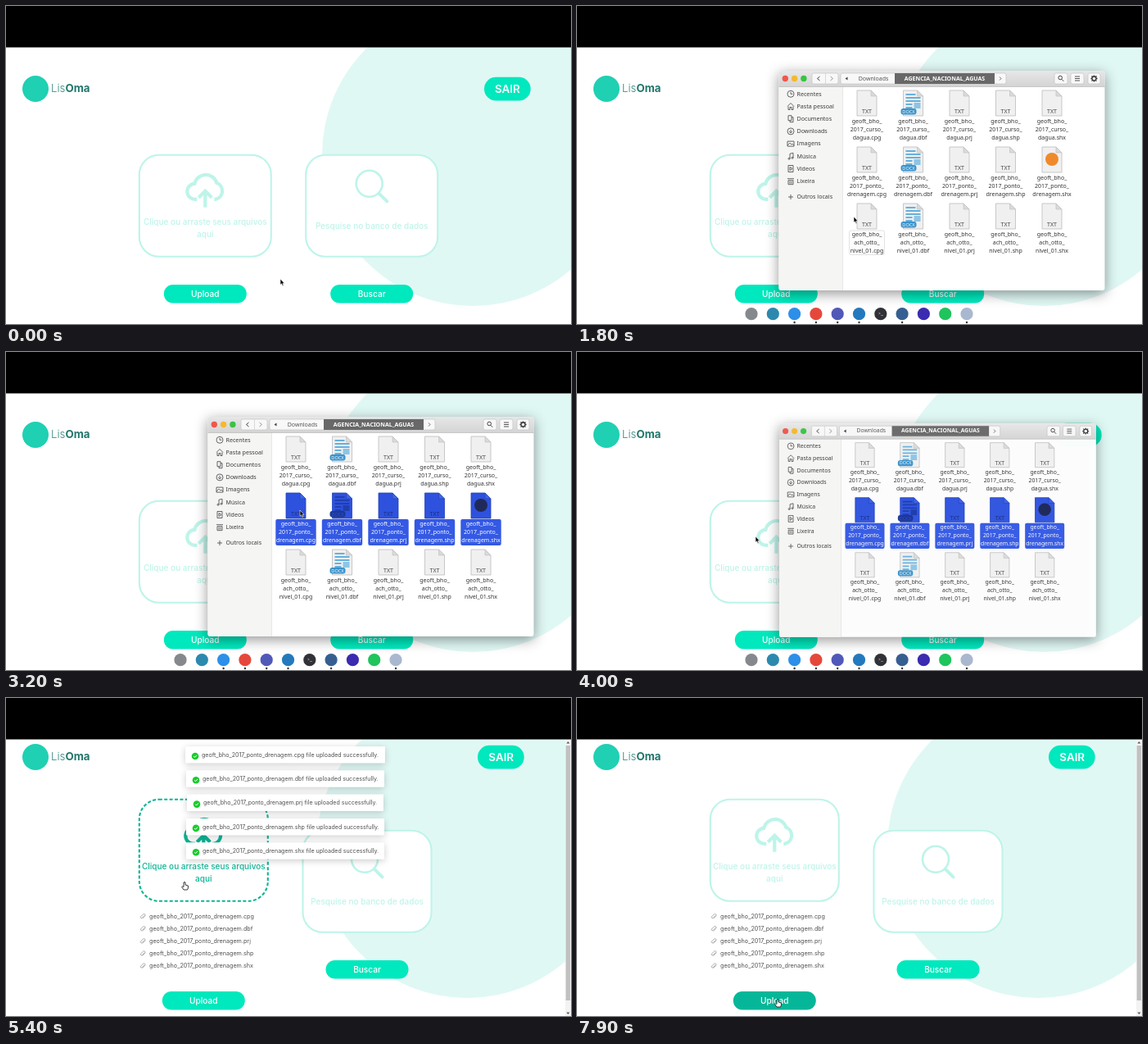
These frames come from a looping animation (690 px wide and 388 px high, 8 s). An HTML page with a canvas:

```html
<!DOCTYPE html>
<html lang="pt">
<head>
<meta charset="utf-8">
<style>
html, body { margin: 0; width: 690px; height: 388px; overflow: hidden; background: #fff; }
canvas { display: block; }
</style>
</head>
<body>
<canvas id="stage" width="690" height="388"></canvas>
<script>
const c = document.getElementById('stage').getContext('2d');
const LOOP = 8000, STEP = 100, TAU = Math.PI * 2;
const UI = 'Inter, sans-serif', DESK = '"Noto Sans", sans-serif';
const MINT = '#00e8bd', PALE = [190, 244, 233], TEAL = [12, 181, 150];
const EXTS = ['cpg', 'dbf', 'prj', 'shp', 'shx'];
const ROWS = [['2017_curso_', 'dagua'], ['2017_ponto_', 'drenagem'], ['ach_otto_', 'nivel_01']];

const ramp = (t, a, b) => Math.min(1, Math.max(0, (t - a) / (b - a)));
const ease = p => p * p * (3 - 2 * p);
const mix = (a, b, p) => a + (b - a) * p;
const blend = p => `rgb(${PALE.map((v, i) => Math.round(mix(v, TEAL[i], p)))})`;

// Pointer tip: time, x, y
const ROUTE = [[0, 335, 333], [100, 335, 333], [500, 265, 375], [850, 265, 375], [1700, 338, 257],
  [1850, 338, 257], [2000, 328, 239], [2600, 606, 186], [2700, 606, 186], [3100, 359, 193],
  [3300, 359, 193], [3900, 218, 225], [6450, 218, 225], [6800, 244, 356], [7100, 244, 356],
  [7400, 245, 368], [8000, 245, 368]];

function pointerAt(t) {
  const i = Math.max(1, ROUTE.findIndex(k => k[0] > t));
  const [a, b] = [ROUTE[i - 1], ROUTE[i]];
  const p = ease(ramp(t, a[0], b[0]));
  return [mix(a[1], b[1], p), mix(a[2], b[2], p)];
}

function rect(x, y, w, h, r, fill, stroke, line = 1) {
  c.beginPath();
  c.roundRect(x, y, w, h, r);
  if (fill) { c.fillStyle = fill; c.fill(); }
  if (stroke) { c.strokeStyle = stroke; c.lineWidth = line; c.stroke(); }
}
function disc(x, y, r, fill) {
  c.beginPath();
  c.arc(x, y, r, 0, TAU);
  c.fillStyle = fill;
  c.fill();
}
function text(s, x, y, size, fill, { align = 'center', weight = 400, font = UI } = {}) {
  c.font = `${weight} ${size}px ${font}`;
  c.textAlign = align;
  c.textBaseline = 'middle';
  c.fillStyle = fill;
  c.fillText(s, x, y);
}
function path(d, x, y, stroke, line, fill) {
  const shape = new Path2D(d);
  c.save();
  c.translate(x, y);
  if (fill) { c.fillStyle = fill; c.fill(shape); }
  if (stroke) { c.strokeStyle = stroke; c.lineWidth = line; c.stroke(shape); }
  c.restore();
}
function shadow(blur, alpha, y = 2) {
  c.shadowColor = `rgba(0,0,0,${alpha})`;
  c.shadowBlur = blur;
  c.shadowOffsetY = y;
}
function noShadow() { c.shadowColor = 'transparent'; }

function button(label, cx, top, fill = MINT) {
  rect(cx - 50.5, top, 101, 22.5, 11.2, fill);
  text(label, cx, top + 11.8, 10.1, '#fff', { weight: 500 });
}

function card(cx, top, width, color, dashed) {
  c.setLineDash(dashed ? [4, 2.4] : []);
  rect(cx - width / 2 + 1, top + 1, width - 2, 124, 24, '#fff', color, 2.1);
  c.setLineDash([]);
}

function page(t) {
  // The whole page lifts while the growing list pushes the left column apart.
  const lift = ramp(t, 4150, 4600), grow = ramp(t, 4210, 4660);
  const bar = t >= 4600 ? 1 : 0;
  const hover = ramp(t, 4150, 4650) * (1 - ramp(t, 6500, 6800));
  const leftTop = 180.8 - 20 * lift - 38 * grow, rightTop = 180.8 - 20 * lift;
  const leftX = 243.3 - 2 * bar, rightX = 446.7 - 5.7 * bar;
  const width = 163 - 4 * bar, headY = 101 - 29 * grow;
  const tint = blend(hover), pale = blend(0);

  disc(570 - 7 * bar, 182, 184, '#e0f8f4');

  disc(36, headY, 16, '#1fd0b3');
  text('Lis', 55, headY, 13.3, '#35877c', { align: 'left', weight: 300 });
  const half = c.measureText('Lis').width;
  text('Oma', 55 + half, headY, 13.3, '#22776c', { align: 'left', weight: 700 });
  rect(584 - 8 * bar, headY - 14.2, 56.7, 28.7, 14.3, MINT);
  text('SAIR', 612.3 - 7.6 * bar, headY + .7, 13.4, '#fff', { weight: 600 });

  card(leftX, leftTop, width, tint, t >= 4150 && t < 6650);
  path('M-10 55h-2a9.5 9.5 0 0 1-1-19a14 14 0 0 1 27-1a10.5 10.5 0 0 1-1 20h-2M0 65V45M-8 53L0 45L8 53',
    leftX, leftTop, tint, 4.2);
  text('Clique ou arraste seus arquivos', leftX, leftTop + 83, 10, tint, { weight: 500 });
  text('aqui', leftX, leftTop + 98.5, 10, tint, { weight: 500 });

  card(rightX, rightTop, width, pale);
  path('M13 36a16 16 0 1 1-32 0a16 16 0 1 1 32 0', rightX, rightTop, pale, 2.6);
  c.lineCap = 'round';
  path('M9 48L18.5 57.5', rightX, rightTop, pale, 4);
  c.lineCap = 'butt';
  text('Pesquise no banco de dados', rightX, rightTop + 88, 10, pale, { weight: 500 });

  const spread = 15.1 * grow ** 1.5;
  EXTS.forEach((ext, i) => {
    c.globalAlpha = i === 4 ? ramp(grow, 0, .7) : ramp(grow, .5, 1);
    const y = leftTop + 143.7 + i * spread;
    path('M2 -1L-1 2A1.2 1.2 0 0 1-2.6 .4L.6 -2.8A1.6 1.6 0 0 1 2.8 -.6L-.6 2.8', 167, y, '#888', .7);
    text(`geoft_bho_2017_ponto_drenagem.${ext}`, 175, y, 7.2, '#505050', { align: 'left' });
  });
  c.globalAlpha = 1;

  button('Upload', leftX, 340 - 20 * lift + 38 * grow, t >= 7300 ? '#05b798' : MINT);
  button('Buscar', rightX, rightTop + 159.2);

  if (bar) {
    rect(683, 50, 7, 338, 0, '#f3f3f3');
    rect(683.7, 58, 5.3, 311, 0, '#c1c1c1');
    path('M-2 1.5L0 -1L2 1.5ZM-2 329.5L0 332L2 329.5Z', 686.4, 54, null, 0, '#555');
  }
}

function toasts(t) {
  EXTS.forEach((ext, i) => {
    const show = ease(ramp(t, 4700 + 90 * i, 4900 + 90 * i));
    const hide = ramp(t, 7450 + 50 * i, 7650 + 50 * i);
    const alpha = show * (1 - hide);
    if (!alpha) return;
    const w = [244, 242, 240, 242, 242][i], x = 341 - w / 2;
    const y = 59 + 29.3 * i - 20 * (1 - alpha);
    c.globalAlpha = alpha;
    shadow(9, .2);
    rect(x, y, w, 20.5, 1, '#fff');
    noShadow();
    disc(x + 12, y + 12, 4.3, '#18cc2c');
    path('M-1.9 0L-.5 1.4L2 -1.3', x + 12, y + 12, '#fff', 1);
    text(`geoft_bho_2017_ponto_drenagem.${ext} file uploaded successfully.`, x + 20, y + 10.7, 7.05,
      '#505050', { align: 'left' });
    c.globalAlpha = 1;
  });
}

function fileIcon(cx, top, kind, selected) {
  const x = cx - 12;
  const edge = selected ? '#2142b8' : '#bcbcbc';
  path('M0 0H17L24 7V31H0Z', x, top, edge, .8, selected ? '#2e52de' : '#f0f0f0');
  path('M17 0V7H24Z', x, top, edge, .6, selected ? '#4264e6' : '#dadada');
  if (kind === 'docx') {
    path('M3 5H15M3 9H21M3 13H21M3 17H11M3 21H11', x, top, selected ? '#203fae' : '#68b0dd', 1.8);
    rect(x + 13, top + 15, 8, 7, 0, selected ? '#203fae' : '#8cc5e6');
    rect(x - 3, top + 22, 19, 7.5, 3, selected ? '#1c3796' : '#3b93cb');
    text('DOCX', x + 6.5, top + 26, 5.6, selected ? '#2e52de' : '#fff', { font: DESK });
  } else if (kind === 'disc') {
    disc(cx, top + 15, 8, selected ? '#202a58' : '#ef8a2c');
  } else {
    text('TXT', cx, top + 26, 7, selected ? '#1a2f80' : '#4c4c4c', { font: DESK });
  }
}

const kindOf = (row, col) => col === 1 ? 'docx' : row === 1 && col === 4 ? 'disc' : 'txt';

const PLACES = [
  ['Recentes', 'M4 0A4 4 0 1 1-4 0A4 4 0 1 1 4 0M0 -2.4V0H2.4'],
  ['Pasta pessoal', 'M-4 0L0 -4L4 0M-3 0V4H-1V1H1V4H3V0'],
  ['Documentos', 'M-3 -4H1V2H-3ZM-1 2V4H3V-2H1'],
  ['Downloads', 'M4 0A4 4 0 1 1-4 0A4 4 0 1 1 4 0M0 -2V2M-2 0L0 2L2 0'],
  ['Imagens', 'M-4 -3H4V3H-4ZM-4 2L-1 -1L1 1L2 0L4 2'],
  ['Música', 'M-1 3V-3L3 -4V2M-1 3A1 1 0 1 1-3 3A1 1 0 1 1-1 3M3 2A1 1 0 1 1 1 2A1 1 0 1 1 3 2'],
  ['Vídeos', 'M-3 -4H3V4H-3ZM-1 -2V2L2 0Z'],
  ['Lixeira', 'M-4 -3H4M-3 -1H3V4H-3ZM-1 0V3M1 0V3'],
  ['Outros locais', 'M-3 0H3M0 -3V3']
];

function fileWindow(t, pointer) {
  const open = ease(ramp(t, 650, 880)) * (1 - ease(ramp(t, 3980, 4180)));
  if (!open) return;
  c.save();
  c.globalAlpha = open;
  c.translate(265 * (1 - open), 376 * (1 - open));
  c.scale(open, open);

  shadow(16, .42, 4);
  rect(246.5, 79, 398, 268, 3, '#fff');
  noShadow();
  rect(246.5, 98, 78, 249, [0, 0, 0, 3], '#f5f5f4');
  rect(324, 98, .7, 249, 0, '#dedede');
  const head = c.createLinearGradient(0, 79, 0, 98);
  head.addColorStop(0, '#e7e7e7');
  head.addColorStop(1, '#d4d4d4');
  rect(246.5, 79, 398, 19.5, [3, 3, 0, 0], head);
  rect(246.5, 98, 398, .7, 0, '#bcbcbc');
  ['#f0564c', '#f5b92c', '#38c443'].forEach((fill, i) => disc(254.3 + 11.3 * i, 88.5, 3.7, fill));

  [[287, 32], [322, 202], [583, 16], [603, 16], [624, 15]].forEach(([x, w]) =>
    rect(x, 82, w, 13, 2, '#f8f8f8', '#c4c4c4', .7));
  rect(303, 82, .6, 13, 0, '#c4c4c4');
  path('M1.5 -2.5L-1.5 0L1.5 2.5', 295, 88.5, '#444', 1);
  path('M-1.5 -2.5L1.5 0L-1.5 2.5', 311, 88.5, '#999', 1);
  path('M1.5 -2L-1.5 0L1.5 2Z', 329, 88.5, null, 0, '#444');
  rect(388, 82, 122, 13, 0, '#686868');
  text('Downloads', 362, 88.5, 7, '#555', { font: DESK });
  text('AGENCIA_NACIONAL_AGUAS', 449, 88.5, 7, '#fff', { font: DESK, weight: 700 });
  path('M-1 -2L1 0L-1 2', 517, 88.5, '#666', 1);
  path('M1.5 -1A2.3 2.3 0 1 1-3.1 -1A2.3 2.3 0 1 1 1.5 -1M.8 .8L3.3 3.3', 591, 88.5, '#444', 1);
  path('M-3 -2.5H3M-3 0H3M-3 2.5H3', 611, 88.5, '#555', 1);
  path('M2.5 0A2.5 2.5 0 1 1-2.5 0A2.5 2.5 0 1 1 2.5 0M0 -4V-2.5M0 4V2.5M-4 0H-2.5M4 0H2.5M-3 -3L-2 -2M3 3L2 2M3 -3L2 -2M-3 3L-2 2',
    631.5, 88.5, '#333', 1.3);

  PLACES.forEach(([label, icon], i) => {
    const y = i === 8 ? 233 : 107.3 + 15.2 * i;
    path(icon, 261, y, '#555', .9);
    text(label, 268.5, y + .3, 7.1, '#3b3b3b', { align: 'left', font: DESK });
  });

  ROWS.forEach(([middle, last], row) => EXTS.forEach((ext, col) => {
    const cx = 354 + 56.5 * col, top = 103 + 69 * row;
    const selected = row === 1 && (t > 2600 || t > 2000 && pointer[0] > cx - 12);
    if (selected) rect(cx - 24.7, top + 32, 49.4, 32, 2, '#3459e4');
    else if (row === 2 && !col && t > 1600 && t < 2000)
      rect(cx - 21.5, top + 33, 43, 29.5, 2, '#fdfdfd', '#dcdcdc', .8);
    fileIcon(cx, top, kindOf(row, col), selected);
    ['geoft_bho_', middle, `${last}.${ext}`].forEach((line, i) =>
      text(line, cx, top + 37.8 + 10 * i, 7, selected ? '#fff' : '#333', { font: DESK }));
  }));

  if (t > 2000 && t <= 2600)
    rect(328, pointer[1], pointer[0] - 328, 239 - pointer[1], 0, 'rgba(52,89,228,.2)', '#3459e4', .8);
  c.restore();
}

function dock(t) {
  const up = ease(ramp(t, 200, 450)) * (1 - ease(ramp(t, 4050, 4250)));
  if (!up) return;
  const fills = ['#85898d', '#2c89ad', '#2d8fe8', '#e5483b', '#5059b8', '#2479bd', '#303238', '#365f91',
    '#3a2bb0', '#1fc45c', '#a9b8cf'];
  const running = [2, 3, 4, 5, 7, 10];
  const drop = 24 * (1 - up);
  fills.forEach((fill, i) => disc(213 + 26.3 * i, 375.7 + drop, 7.6, fill));
  text('>_', 371, 375.5 + drop, 5, '#ddd', { font: '"Noto Sans Mono", monospace' });
  running.forEach(i => disc(213 + 26.3 * i, 386 + drop, 1.2, '#333'));
}

function pointerIcon(t, [x, y]) {
  if (t > 3300 && t < 3950) {
    c.globalAlpha = .6;
    [2, 1, 0].forEach(i => fileIcon(x + 4 + 3 * i, y - 8 + 3 * i, 'txt', true));
    c.globalAlpha = 1;
  }
  const hand = t >= 4100 && t < 6650 || t >= 7300;
  if (hand)
    path('M-1 0Q0 -1 1 0V3L4.4 4V7L3.5 9H-1L-3.4 5.5Q-3 4-1 5.5Z', x, y, '#222', .9, '#fff');
  else
    path('M0 0V7.2L1.6 5.8L2.8 8.4L4 7.9L2.9 5.4H5Z', x, y, '#fff', .6, '#000');
}

function draw(t) {
  const pointer = pointerAt(t);
  rect(0, 0, 690, 388, 0, '#fff');
  page(t);
  fileWindow(t, pointer);
  dock(t);
  toasts(t);
  rect(0, 0, 690, 50.5, 0, '#000');
  pointerIcon(t, pointer);
}

function tick() {
  draw(Math.floor(performance.now() % LOOP / STEP) * STEP);
  requestAnimationFrame(tick);
}
tick();
</script>
</body>
</html>
```
